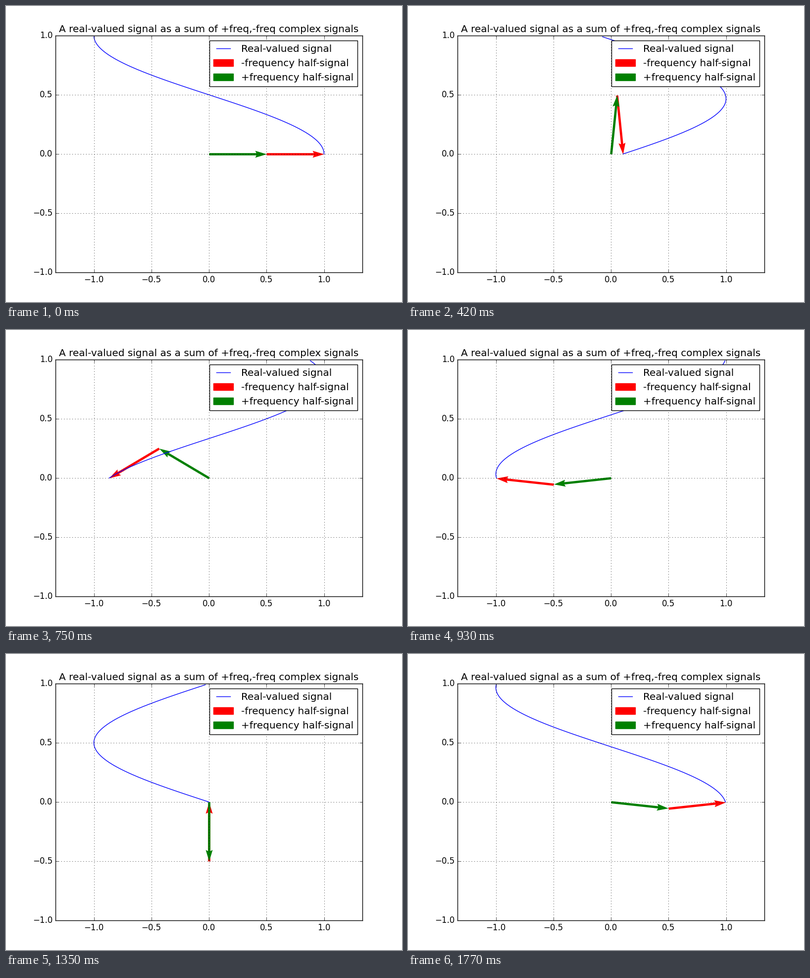
These frames come from a looping animation (800 px wide and 600 px high, 1800 ms). A matplotlib script:

```python
import numpy as np
import matplotlib.pyplot as plt
from matplotlib.animation import FuncAnimation
from matplotlib.patches import Patch

FRAMES = 60
INTERVAL = 30

plt.style.use("classic")
plt.rcParams["font.family"] = "DejaVu Sans"

fig = plt.figure(figsize=(8, 6), dpi=100, facecolor="white")
ax = fig.add_axes([0.125, 0.1, 0.775, 0.8])
ax.set_xlim(-4 / 3, 4 / 3)
ax.set_ylim(-1, 1)
ax.set_xticks(np.linspace(-1, 1, 5))
ax.set_yticks(np.linspace(-1, 1, 5))
ax.grid(True)
ax.set_title("A real-valued signal as a sum of +freq,-freq complex signals")

# The trace shows the past of the signal, older values higher up.
age = np.arange(0, 1, 0.01)
trace, = ax.plot(np.cos(np.pi * age), age, color="blue")


def arrow(color):
    return ax.quiver([0], [0], [0.5], [0], color=color,
                     angles="xy", scale_units="xy", scale=1)


neg = arrow("red")
pos = arrow("green")

ax.legend(
    [trace, Patch(color="red"), Patch(color="green")],
    ["Real-valued signal", "-frequency half-signal", "+frequency half-signal"],
    loc="upper right",
)


def update(i):
    phase = 2 * np.pi * i / FRAMES
    u, v = 0.5 * np.cos(phase), 0.5 * np.sin(phase)
    trace.set_xdata(np.cos(phase - np.pi * age))
    pos.set_UVC([u], [v])
    neg.set_offsets([[u, v]])
    neg.set_UVC([u], [-v])
    return trace, neg, pos


anim = FuncAnimation(fig, update, frames=FRAMES, interval=INTERVAL,
                     repeat=True, repeat_delay=0, blit=False)
plt.show()
```
